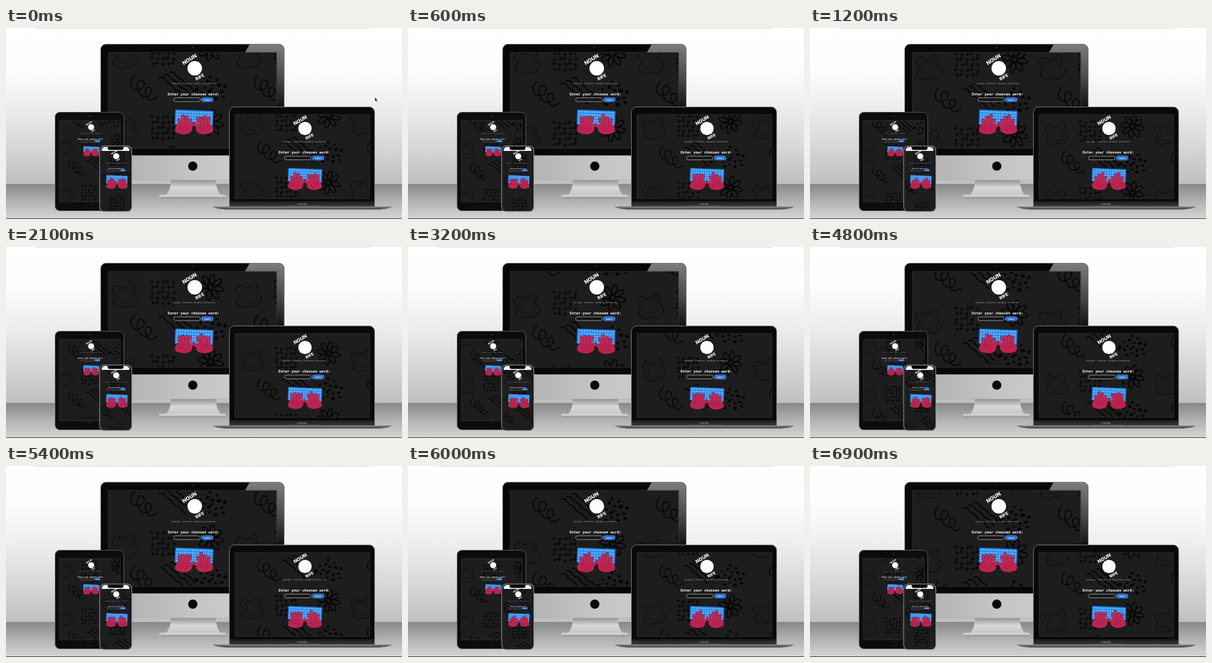
These frames come from a looping animation (600x289 px, 7000 ms). An HTML page with a canvas:

```html
<!DOCTYPE html>
<html lang="en">
<head>
<meta charset="utf-8">
<title>Responsive preview</title>
<style>
html, body { margin: 0; width: 100%; height: 100%; overflow: hidden; background: #fff; }
canvas { display: block; }
</style>
</head>
<body>
<canvas id="stage" width="600" height="289"></canvas>
<script>
const ctx = document.getElementById('stage').getContext('2d');
const LOOP = 7000, STEP = 100;
const TILE = { w: 187, h: 113, speed: 14.7 };
const MONO = '"DejaVu Sans Mono", monospace';
const SANS = 'Inter, sans-serif';

const screens = [
  { x: 155, y: 37, w: 255, h: 145, blobX: 180, blobY: 43, pattern: 1,
    cx: 284, logo: [286, 61, 1], tag: [85, 1], title: [102.3, 1], form: [108.5, 1], typing: [285, 136, 1] },
  { x: 347, y: 131, w: 204, h: 127, blobX: 373, blobY: 145, pattern: .89,
    cx: 452, logo: [453, 152, .92], tag: [173.3, 1], title: [190.3, 1], form: [196.7, 1], typing: [453, 223, .89] },
  { x: 81, y: 140, w: 92, h: 123, blobX: 89, blobY: 180, pattern: .64,
    cx: 128, logo: [129, 150, .42], tag: [159.6, .5], title: [168.7, .49], form: [171.2, .5], typing: [129, 184, .41] },
  { x: 144, y: 181, w: 44, h: 95, blobX: 134, blobY: 200, pattern: .6,
    cx: 167, logo: [167, 194, .42], tag: [205, .5], title: [212.6, .31], form: [215.2, .48], typing: [168, 229.5, .56] }
];

function at(x, y, scale, angle, draw) {
  ctx.save();
  ctx.translate(x, y);
  ctx.rotate(angle);
  ctx.scale(scale, scale);
  draw();
  ctx.restore();
}

function paint(fill, stroke, line) {
  if (fill) { ctx.fillStyle = fill; ctx.fill(); }
  if (stroke) { ctx.strokeStyle = stroke; ctx.lineWidth = line; ctx.stroke(); }
}

function box(x, y, w, h, r, fill, stroke, line = 1) {
  ctx.beginPath();
  ctx.roundRect(x, y, w, h, r);
  paint(fill, stroke, line);
}

function oval(x, y, rx, ry, fill, stroke, line = 1) {
  ctx.beginPath();
  ctx.ellipse(x, y, rx, ry, 0, 0, Math.PI * 2);
  paint(fill, stroke, line);
}

function shape(path, fill, stroke, line = 1) {
  const p = new Path2D(path);
  if (fill) { ctx.fillStyle = fill; ctx.fill(p); }
  if (stroke) { ctx.strokeStyle = stroke; ctx.lineWidth = line; ctx.stroke(p); }
}

function text(str, x, y, font, color) {
  ctx.font = font;
  ctx.fillStyle = color;
  ctx.fillText(str, x, y);
}

function fade(x0, y0, x1, y1, ...colors) {
  const g = ctx.createLinearGradient(x0, y0, x1, y1);
  colors.forEach((c, i) => g.addColorStop(i / (colors.length - 1), c));
  return g;
}

// One repeat of the doodle wallpaper, centred on the wobbly blob.
function doodles() {
  const ink = '#050505';
  ctx.lineCap = 'round';
  shape('M-16-14C-10-20-7-9 0-13S8-23 13-17 9-6 15-2 23 5 17 10 13 19 5 16-3 22-9 17-17 17-17 9-10 3-15-2-21-9-16-14Z', null, ink, .9);
  shape('M-10-9C-6-13-4-6 1-9S8-14 9-10 6-4 10 0 14 6 9 9 4 12 0 10-7 12-10 8-7 2-9-2-13-6-10-9Z', null, '#101010', .6);
  for (let i = 0; i < 25; i++) {
    const x = 41 + i % 5 * 8 + i * 7 % 3, y = -22 + Math.floor(i / 5) * 8 + i * 5 % 3;
    shape(`M${x - 2.4} ${y}h4.8m-2.4-2.4v4.8`, null, ink, 1.3);
  }
  at(29, 48, 1, 0, () =>
    shape('M-14-19C-24-8-20 4-8 2S2-14-6-12-10 14 2 13 14-2 6-1 4 20 12 18L20 14', null, ink, 1.6));
  for (let i = 0; i < 3; i++)
    shape(`M${52 + i * 8} ${32 - i * 4}c9-3 8 7 15 9s6 10 13 11 5 9 12 10`, null, ink, 1.9);
  for (let i = 0; i < 8; i++)
    at(130, -13, 1, i * Math.PI / 4 + .2, () => oval(0, -12.5, 3.7, 7.5, null, ink, 1.8));
  oval(130, -13, 3.4, 3.4, null, ink, 1.6);
  for (let i = 0; i < 18; i++) {
    const a = i * 2.4, r = 5.6 * Math.sqrt(i);
    oval(132 + r * Math.cos(a), 49 + r * .85 * Math.sin(a), 2 + i % 3 * .6, 1.8 + i % 2 * .8, ink);
  }
}

function wallpaper(s, t) {
  const k = s.pattern;
  const shift = TILE.speed * t / 1000 % TILE.h;
  for (let col = -1; col < 3; col++)
    for (let row = -2; row < 3; row++)
      at(s.blobX + col * TILE.w * k, s.blobY + (shift + row * TILE.h) * k, k, 0, doodles);
}

function logo() {
  oval(0, 0, 11, 11, '#fff');
  at(-8, -13.5, 1, -.55, () => text('NOUN', 0, 2.8, `800 8px ${SANS}`, '#fff'));
  at(7.5, 13, 1, -.5, () => text('RIFE', 0, 2.6, `800 6.6px ${SANS}`, '#fff'));
}

function form() {
  box(-30, -2.8, 40.5, 5.6, 2.8, '#171717', '#d2d2d2', .6);
  box(12, -3.3, 18, 6.6, 3.3, '#2872d9', '#73a7ee', .4);
  text('Submit', 21, 1, `bold 2.8px ${MONO}`, '#fff');
}

function hand(side, beat) {
  const lift = Math.sin(beat * 2.1 + side) * 1.2;
  at(side * 14.5, 13.5 + lift * .5, 1.06, -side * .12, () => {
    ctx.scale(side, 1);
    for (const [color, width] of [['#74163a', 4.8], ['#c52a58', 3.7]])
      for (let f = 0; f < 5; f++) {
        const reach = [-4, -11, -14, -13, -9][f] + Math.sin(beat * 1.7 + f * 2 + side) * 1.8;
        shape(`M${-7 + f * 3.6} 1Q${-10 + f * 4.2} ${reach / 2} ${-12 + f * 5.2} ${reach}`, null, color, width);
      }
    shape('M-11 0Q-2-7 9-3Q15 3 12 9Q4 13-5 10Q-13 7-11 0Z', '#bc244f');
    shape('M-5 1q1 4 4 6M0-1q1 4 3 6M5-1q0 4 2 6', null, '#8c1b40', .7);
  });
}

function typing(beat) {
  ctx.lineCap = 'round';
  at(0, 0, 1, .04, () => {
    box(-29, -11.5, 58, 23, 1.5, '#1c7fe6');
    for (let row = 0; row < 5; row++)
      for (let col = 0; col < 14; col++)
        box(-27.3 + col * 3.95, -10 + row * 4.2, 3, 3, .5, '#62b4f8');
  });
  hand(-1, beat);
  hand(1, beat + 1.5);
}

function page(s, t) {
  ctx.save();
  ctx.beginPath();
  ctx.rect(s.x, s.y, s.w, s.h);
  ctx.clip();
  ctx.fillStyle = '#1d1d1d';
  ctx.fillRect(s.x, s.y, s.w, s.h);
  wallpaper(s, t);
  at(...s.logo, 0, logo);
  at(s.cx, ...s.tag, 0, () => text('Synonyms, Citations, Wordplay Invitations', 0, 0, `2.7px ${MONO}`, '#d0d0d0'));
  at(s.cx, ...s.title, 0, () => text('Enter your choosen word:', 0, 0, `bold 5.4px ${MONO}`, '#fff'));
  at(s.cx, ...s.form, 0, form);
  at(...s.typing, 0, () => typing(t / STEP));
  ctx.restore();
  ctx.strokeStyle = '#3c3c3c';
  ctx.lineWidth = .6;
  ctx.strokeRect(s.x, s.y, s.w, s.h);
}

function room() {
  ctx.fillStyle = fade(0, 0, 0, 236, '#fff', '#fdfdfd', '#eee', '#d8d8d8', '#bfbfbf');
  ctx.fillRect(0, 0, 600, 236);
  ctx.fillStyle = fade(0, 236, 0, 289, '#888', '#b2b2b2', '#d6d6d6');
  ctx.fillRect(0, 236, 600, 53);
  ctx.fillStyle = '#e2e2e2';
  ctx.fillRect(45, 0, 507, 1);
  ctx.fillStyle = '#444';
  ctx.fillRect(0, 288, 600, 1);
}

function desktop(t) {
  shape('M250 228H318Q318 246 326 253H242Q250 246 250 228Z', fade(0, 229, 0, 254, '#8d8d8d', '#d8d8d8', '#c4c4c4'));
  box(232, 252.5, 101, 5, 2, fade(0, 252, 0, 258, '#e0e0e0', '#c6c6c6', '#777'));
  box(143.5, 24.5, 278, 175, 8, '#080808', '#777');
  shape('M369 25H414Q421 25 421 33V182H410V37H362Z', fade(395, 25, 395, 125, '#7c7c7c', '#4a4a4a', '#0b0b0b'));
  box(143, 193, 279, 37, [0, 0, 8, 8], fade(143, 0, 422, 0, '#adadad', '#c4c4c4', '#d2d2d2'), '#aaa', .6);
  oval(283, 29.5, 1, 1, '#333a44');
  oval(283, 209, 7, 7, '#080808');
  page(screens[0], t);
}

function laptop(t) {
  box(338.5, 119.5, 220, 151, [8, 8, 0, 0], '#090909', '#737373');
  box(339, 262, 219, 8, 0, fade(0, 262, 0, 270, '#1b1b1e', '#38383d'));
  text('FoldTop', 448.5, 268.4, `3.8px ${SANS}`, '#a6a6a6');
  shape('M313 270H585Q583 273 566 274.5H332Q315 273 313 270Z', fade(0, 269, 0, 275, '#a3a3a9', '#66666c', '#2c2c30'));
  box(425, 269.5, 52, 1.8, 1, '#77777e');
  page(screens[1], t);
}

function tablet(t) {
  box(74.5, 127.5, 104, 149, 7, '#0c0c0d', '#555');
  oval(127, 133.5, 1, 1, '#39404a');
  oval(127, 269.5, 3.6, 3.6, '#080808', '#2c2c30', .7);
  page(screens[2], t);
}

function phone(t) {
  box(142, 178.7, 48.5, 99, 7, '#070707', '#8a8a8a', 1.2);
  page(screens[3], t);
  box(145, 180, 42, 6, [5, 5, 0, 0], '#f2f2f2');
  box(154, 179.5, 24, 5, [0, 0, 3, 3], '#070707');
}

function pointer(t) {
  if (t >= 500) return;
  at(559 + t * .07, 105, 1, 0, () =>
    shape('M0 0V6L1.4 4.7 2.4 7 3.4 6.5 2.4 4.3H4.2Z', '#111', '#fff', .35));
}

function frame(now) {
  const t = Math.floor(now % LOOP / STEP) * STEP;
  ctx.textAlign = 'center';
  room();
  desktop(t);
  laptop(t);
  tablet(t);
  phone(t);
  pointer(t);
  requestAnimationFrame(frame);
}
requestAnimationFrame(frame);
</script>
</body>
</html>
```
